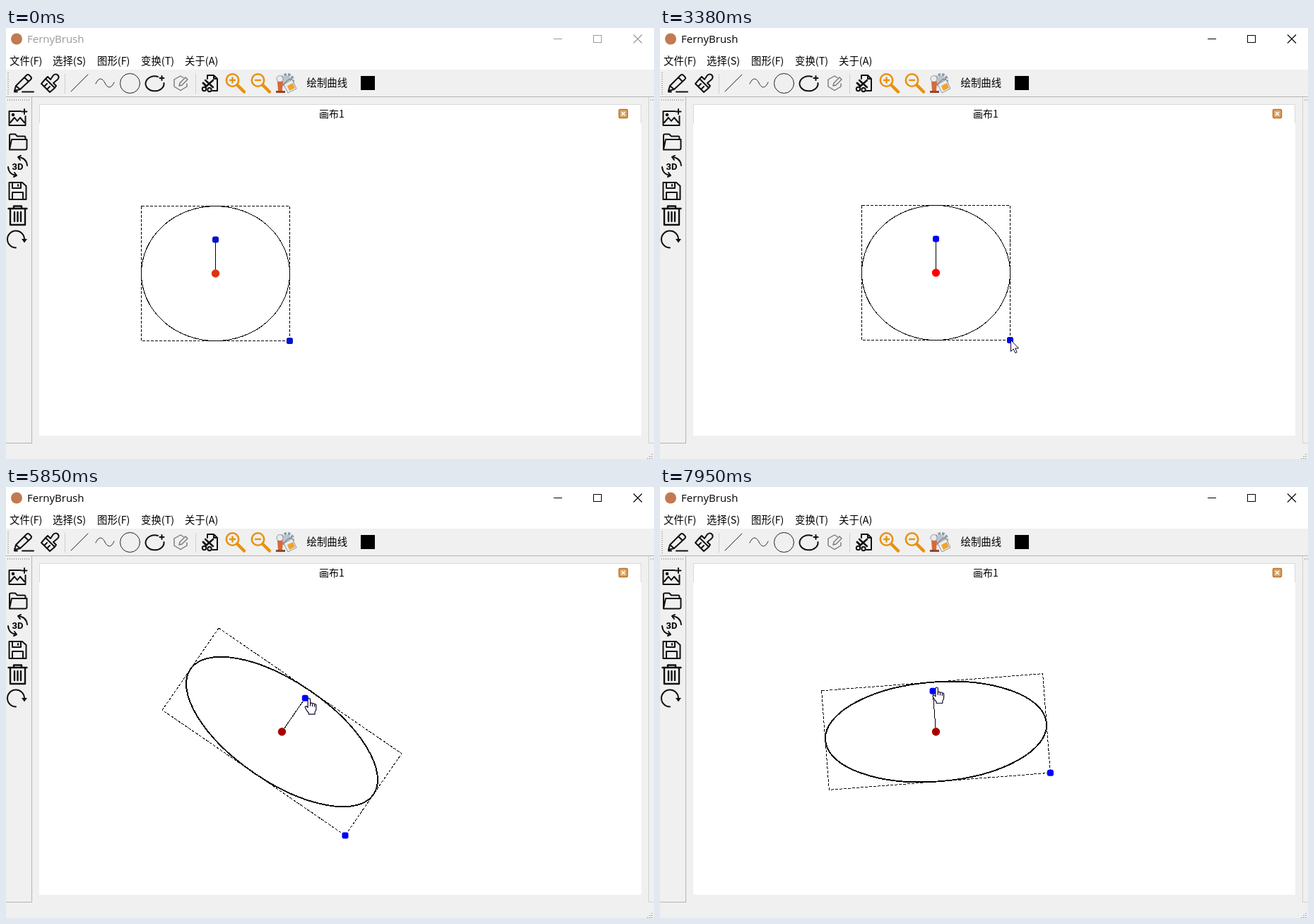
Write an HTML page that moves like this. It is 917x611 px and loops after 8000 ms.

```html
<!DOCTYPE html>
<html lang="zh">
<head>
<meta charset="utf-8">
<title>Canvas demo</title>
<style>
html, body { margin: 0; width: 100%; height: 100%; overflow: hidden; background: #f0f0f0; }
svg { display: block; width: 100%; height: 100%; }
text { font: 14.4px "Noto Sans CJK SC", "Noto Sans CJK JP", "Noto Sans CJK", sans-serif; }
.crisp { shape-rendering: crispEdges; }
.icon { fill: none; stroke: #111; stroke-width: 2; stroke-linejoin: round; stroke-linecap: round; }
.thin { stroke-width: 1; stroke: #222; }
</style>
</head>
<body>
<svg viewBox="0 0 917 611">
  <g class="crisp">
    <rect width="917" height="611" fill="#f0f0f0"/>
    <rect width="917" height="59" fill="#fff"/>
    <path d="M0 97.5H917" stroke="#b4b4b4"/>
    <path d="M36.5 98V588.5H0" fill="none" stroke="#b4b4b4"/>
    <path d="M909.5 98V588.5H917" fill="none" stroke="#d2d2d2"/>
    <rect x="47" y="108" width="852" height="470" fill="#fff"/>
    <path d="M47.5 135V108.5H898.5V135" fill="none" stroke="#dadada"/>
    <path d="M83.5 65V93M268.5 65V93" stroke="#d0d0d0"/>
    <g stroke="#a8a8a8" stroke-width="2" stroke-dasharray="1 2">
      <path d="M3 63V94M2 102H35M912 102H917M914 604V611M911 607V611M908 610V611"/>
    </g>
    <rect x="502" y="68" width="20" height="20"/>
  </g>

  <circle cx="15" cy="15.5" r="8" fill="#c17a52"/>
  <g id="caption">
    <text x="30" y="21" style="font:15px 'Open Sans','Noto Sans',sans-serif">FernyBrush</text>
    <g class="crisp" fill="none" stroke="currentColor">
      <path d="M775 15.5H787"/><rect x="831.5" y="10.5" width="11" height="10"/>
    </g>
    <path d="M888 9.500L900 21.500M900 9.500L888 21.500" stroke="currentColor" stroke-width="1.1"/>
  </g>
  <g id="menu"></g>
  <text x="425.500" y="83">绘制曲线</text>
  <text x="443" y="127" style="font-size:14px">画布1</text>
  <rect x="867.500" y="115.500" width="12" height="12" rx="1.500" fill="#dda564" stroke="#b8722c" stroke-width="1.500"/>
  <path d="M871 119L876 124M876 119L871 124" stroke="#fff" stroke-width="1.700"/>

  <g class="icon">
    <path d="M12 89L14 82L29 67Q31 65 33 67L35 69Q37 71 35 73L20 87ZM26 70L32 76M14 82L20 87M23 90.500H39M12 90.500H16"/>
    <path d="M67 67Q71 64 73.500 67T73 73L67 78L71 82L69 85L56 72L59 69L63 73ZM56 72L50 79L62 91L69 85M54 83L58 79M58 87L62 83"/>
    <path class="thin" d="M92 90L116 66"/>
    <path class="thin" d="M127 79C131 70 136 70 140 78S149 86 153 77"/>
    <circle class="thin" cx="175.500" cy="78.500" r="14"/>
    <path d="M215 69A13 10.500 0 1 0 223.500 78M220.500 68V74M217.500 71H223.500"/>
    <path d="M251 70.500L247 68L238 73V83L247 88.500L256 83V79M245 82L246 78L254 70L257 73L249 81Z" stroke="#777" stroke-width="1.400"/>
    <path d="M285 72V67H294L299 72V89H292M294 67V72H299"/>
    <path d="M282 74L293 84M293 74L282 84M286 80L292 75" stroke-width="2.400"/>
    <circle cx="280.500" cy="86.500" r="2.700"/><circle cx="288" cy="87.500" r="2.700"/>
    <path d="M279 78L283 82" stroke-width="3"/>
  </g>

  <g id="zooms" fill="none" stroke="#e8920f"></g>

  <g>
    <circle cx="398" cy="74" r="8" fill="none" stroke="#8b9bab" stroke-width="4" stroke-dasharray="3.500 2"/>
    <circle cx="397" cy="74" r="6.500" fill="#b9c4ce"/>
    <circle cx="387.500" cy="72" r="4.500" fill="#e8ebee" stroke="#999"/>
    <path d="M384 76H392L391 89H385Z" fill="#d9683a"/>
    <path d="M382 89H395V92H382Z" fill="#8c4a2c"/>
    <path d="M393 80L405 73L411 86L399 92Z" fill="#e9edf0" stroke="#8d969e"/>
    <path d="M398 82L406 78L409 85L401 89Z" fill="#f0a32c"/>
    <path d="M393 80Q400 70 405 73" fill="none" stroke="#666"/>
  </g>

  <g class="icon">
    <path d="M21 118H4.500V138H27.500V125M26 115V122M22.500 118.500H29.500M6 134L12 127L16 132L20 127L26 134"/>
    <circle cx="10" cy="123" r="1.300"/>
    <path d="M5 172V152Q5 150.500 7 150.500H13L16 153.500H26Q27.500 153.500 27.500 156V157M5 172L8 158H29.500V170Q29.500 172.500 27 172.500H5"/>
    <path d="M17 183Q29 184 30 195M17 183L21 181M17 183L20 187M3 197Q4 208 15 209M15 209L12 205M15 209L11 211"/>
    <path d="M4.500 219H23L28.500 224V243H4.500ZM9 219V227H21V219M9 243V233H24V243M17 222V224"/>
    <path d="M3.500 256H29.500M11 255V252.500H22V255M6 257V279H27V257M12 261V274M16.500 261V274M21 261V274" stroke-width="2.400"/>
    <path d="M14 311.500A12 12 0 1 1 26 299"/>
    <path d="M22 299H30L26 304.500Z" fill="#111" stroke="none"/>
  </g>
  <text x="16.500" y="201" text-anchor="middle" style="font:bold 13px Roboto,sans-serif">3D</text>

  <g id="shape" class="crisp" fill="none" stroke="#000">
    <g id="frame">
      <rect id="box" stroke-dasharray="4 2"/>
      <ellipse id="oval"/>
      <path id="arm"/>
    </g>
    <g stroke="none" shape-rendering="auto">
      <circle id="hub" r="5.700"/>
      <rect id="turn" width="9" height="9" rx="3"/>
      <rect id="grip" width="9" height="9" rx="2.500"/>
    </g>
  </g>

  <g id="cursor" fill="#fff" stroke="#0a0a2a" stroke-linejoin="round">
    <path id="arrow" d="M.5 .5V16.500L4.200 13L6.800 18.700L9.200 17.700L6.700 12H11.500Z"/>
    <g id="hand" stroke-width="1.200">
      <path d="M-1.700 13V1.700A1.700 1.700 0 0 1 1.700 1.700V7Q3.500 5.500 4.800 7.500Q6.600 6.200 7.800 8.200Q10 7.500 10 10V15Q10 17 8.200 19.500V22.500H-.5V20.500Q-3 18-5.300 13.500Q-6 11.500-4.500 11Q-3.200 11-1.700 13Z"/>
      <path d="M1.700 7V11M4.800 8V11.500M7.800 8.500V12" fill="none"/>
    </g>
  </g>
</svg>
<script>
const LOOP = 8000, STEP = 78;
const $ = id => document.getElementById(id);
const set = (id, attrs) => { for (const k in attrs) $(id).setAttribute(k, attrs[k]); };
const show = (id, on) => set(id, { display: on ? "inline" : "none" });

const menu = [[5, "文件(F)"], [66, "选择(S)"], [129, "图形(F)"], [191, "变换(T)"], [253, "关于(A)"]];
$("menu").innerHTML = menu.map(([x, s]) => `<text x="${x}" y="52">${s}</text>`).join("");
$("zooms").innerHTML = [[320.500, "M316 74H325M320.500 69.500V78.500"], [356.500, "M352 74H361"]].map(([x, sign]) =>
  `<circle cx="${x}" cy="74" r="8.700" stroke-width="2.600"/>
   <path d="${sign}" stroke-width="2.400"/>
   <path d="M${x + 7} 81L${x + 16.500} 90.500" stroke-width="4.500" stroke-linecap="round"/>`).join("");

const gestures = [380, 1370, 1850, 2680, 3780, 4620, 5610];
function snap(t) {
  const s = gestures.filter(g => g <= t).pop();
  return s === undefined ? t : s + Math.floor((t - s) / STEP + 1e-6) * STEP;
}

// Linear interpolation over [time, ...values] rows.
function track(rows, t) {
  const i = rows.findIndex(r => r[0] > t);
  if (i < 0) return rows[rows.length - 1].slice(1);
  if (i === 0) return rows[0].slice(1);
  const a = rows[i - 1], b = rows[i], p = (t - a[0]) / (b[0] - a[0]);
  return a.slice(1).map((v, k) => v + (b[k + 1] - v) * p);
}

const pointer = [
  [380, 572, 543], [1130, 309, 350], [1370, 306, 350], [1526, 301, 350],
  [2006, 301, 350], [2474, 395, 349], [2552, 408, 351], [2679, 408, 351],
  [2680, 445, 385], [2758, 488, 426], [2910, 490, 430], [3304, 496, 442],
  [3702, 496, 442], [4326, 548, 418], [4404, 546, 416], [4560, 434, 321],
  [4620, 424, 316], [4854, 386, 299], [5010, 385, 294], [5166, 395, 292]
];
const place = [[2006, 296.500, 348], [2474, 390.500, 347]];
const size = [[3702, 105, 95.500, 48], [4326, 157, 70.500, 58]];
const spin = [[5610, 2], [6390, 110.300], [7170, 191], [7950, 355.600]];
const orbit = [[5610, 6, 54], [6390, 116.200, 77], [7170, 191, 68], [7950, 361, 63]];
const hidden = [[1850, 2084], [3620, 3780], [5470, 5610]];
const handTimes = [[1526, 2552], [3620, 4404], [5088, LOOP]];
const within = (spans, t) => spans.some(([a, b]) => t >= a && t < b);

function polar(cx, cy, deg, r) {
  const a = deg * Math.PI / 180;
  return [cx + r * Math.sin(a), cy - r * Math.cos(a)];
}

function render(t) {
  const q = snap(t), active = t >= 1850, turning = t >= 5610;
  set("caption", { fill: active ? "#000" : "#999", color: active ? "#000" : "#999" });

  const [cx, cy] = track(place, q), [rx, ry, len] = track(size, q);
  const angle = turning ? track(spin, q)[0] : 0;
  show("shape", !within(hidden, t));
  set("frame", { transform: `translate(${cx} ${cy}) rotate(${angle})` });
  set("box", { x: -rx, y: -ry, width: 2 * rx, height: 2 * ry });
  set("oval", { rx, ry, "stroke-width": turning ? 1.900 : 1 });
  set("arm", { d: `M0 0V${-len}` });

  const blue = active ? "#00f" : "#0612c8";
  const corner = Math.atan2(rx, -ry) * 180 / Math.PI;
  const [tx, ty] = polar(cx, cy, angle, len);
  const [gx, gy] = polar(cx, cy, angle + corner, Math.hypot(rx, ry));
  set("hub", { cx, cy, fill: !active ? "#dc340c" : turning ? "#a80000" : "#f00" });
  set("turn", { x: tx - 4.500, y: ty - 4.500, fill: blue });
  set("grip", { x: gx - 4.500, y: gy - 4.500, fill: t > 4326 && !turning ? "#0000b4" : blue });

  const hand = within(handTimes, q === t ? t : Math.max(q, t));
  const [px, py] = turning ? polar(cx, cy, ...track(orbit, q)) : track(pointer, q);
  show("cursor", t >= 380);
  show("hand", hand);
  show("arrow", !hand);
  set("cursor", { transform: `translate(${px} ${py})` });
}

function loop() {
  render(performance.now() % LOOP);
  requestAnimationFrame(loop);
}
loop();
</script>
</body>
</html>
```
